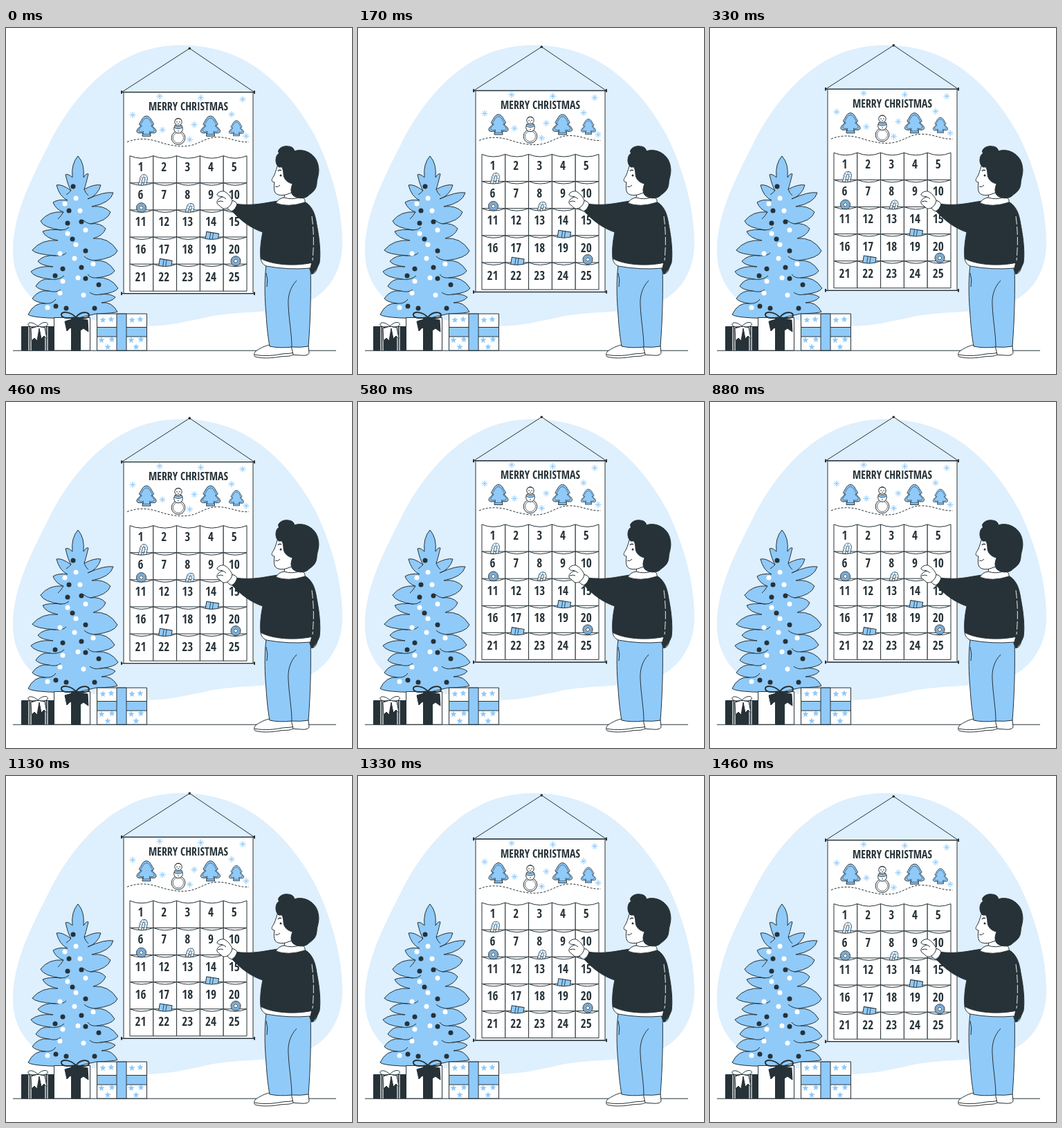
An HTML page with a canvas that plays this animation: 500 px wide and 500 px high, repeating every 1500 ms.

```html
<!DOCTYPE html>
<html lang="en">
<head>
<meta charset="utf-8">
<title>Advent calendar</title>
<style>
html, body { margin: 0; width: 100%; height: 100%; overflow: hidden; background: #fff; }
canvas { display: block; width: 500px; height: 500px; }
</style>
</head>
<body>
<canvas id="stage"></canvas>
<script>
const LOOP = 1500, STEPS = 36, LIFT = 10;
const BLUE = '#90caf9', PALE = '#deeffd', DARK = '#263238', WHITE = '#fff';
const FACE = '"Open Sans Condensed", "Roboto Condensed", "Open Sans", Roboto, sans-serif';

const canvas = document.getElementById('stage');
const ctx = canvas.getContext('2d');
const ratio = window.devicePixelRatio || 1;
canvas.width = canvas.height = 500 * ratio;

function shape(d, fill, stroke = DARK, width = 1) {
  const path = d instanceof Path2D ? d : new Path2D(d);
  if (fill) { ctx.fillStyle = fill; ctx.fill(path); }
  if (stroke) { ctx.strokeStyle = stroke; ctx.lineWidth = width; ctx.stroke(path); }
}

function disc(x, y, r, fill, stroke = null, width = 1) {
  const path = new Path2D();
  path.arc(x, y, r, 0, Math.PI * 2);
  shape(path, fill, stroke, width);
}

function box(x, y, w, h, fill, stroke = DARK) {
  const path = new Path2D();
  path.rect(x, y, w, h);
  shape(path, fill, stroke);
}

function at(x, y, draw, scale = 1, turn = 0) {
  ctx.save();
  ctx.translate(x, y);
  ctx.rotate(turn);
  ctx.scale(scale, scale);
  draw();
  ctx.restore();
}

function fontSize(sample, room, largest) {
  ctx.font = `100px ${FACE}`;
  return Math.min(largest, 100 * room / ctx.measureText(sample).width);
}

function label(text, x, y, size) {
  ctx.font = `${size}px ${FACE}`;
  ctx.textAlign = 'center';
  ctx.fillStyle = DARK;
  ctx.fillText(text, x, y + ctx.measureText('H').actualBoundingBoxAscent / 2);
}

function background() {
  shape('M10 322C10 268 38 216 60 172C88 114 128 67 175 43C216 22 266 20 311 33C370 50 416 100 446 155' +
    'C471 205 487 265 486 313C485 352 466 384 430 399C382 414 334 408 290 418C250 427 220 433 190 430' +
    'C150 428 122 420 92 416C45 408 10 374 10 322Z', PALE, null);
  shape('M10 466.2H477');
}

// Tree: each branch is a tip followed by the notch below it.
const rightBranches = [
  [119, 211, 113, 233], [137, 227, 118, 247], [155, 238, 124, 258], [151, 266, 122, 283],
  [144, 290, 126, 304], [161, 322, 128, 336], [157, 351, 131, 361], [162, 376, 136, 385],
  [158, 389, 138, 397], [161, 410, 130, 413]
];
const leftBranches = [
  [86, 212, 94, 235], [73, 227, 89, 249], [68, 252, 83, 266], [50, 279, 80, 292],
  [53, 294, 75, 307], [38, 321, 72, 329], [46, 337, 68, 345], [36, 352, 64, 363],
  [43, 373, 62, 380], [38, 391, 57, 398], [32, 414, 62, 419]
];

function branchSide(path, branches, side) {
  let x = 104 + side * 8, y = 216;
  path.moveTo(104, 185);
  path.quadraticCurveTo(104 + side * 10, 196, x, y);
  for (const [tx, ty, nx, ny] of branches) {
    path.quadraticCurveTo(x + (tx - x) * 0.65, Math.min(y, ty) - 2, tx, ty);
    path.quadraticCurveTo(tx - side * 4, ty + (ny - ty) * 0.75, nx, ny);
    x = nx; y = ny;
  }
  path.lineTo(100, 420);
}

function pine() {
  const path = new Path2D();
  branchSide(path, rightBranches, 1);
  branchSide(path, leftBranches, -1);
  shape(path, BLUE);
  shape('M94 235Q90 239 87 241M113 233Q115 239 119 242M83 266Q79 273 75 276M122 283Q116 282 112 278' +
    'M80 292Q87 292 91 288M72 329Q82 330 87 325M128 336Q118 335 113 330M64 363Q76 365 84 358' +
    'M131 361Q123 362 118 356M62 380Q72 383 79 378M136 385Q127 387 121 382M57 398Q67 399 72 392', null);
  const dark = [[97, 229], [91, 264], [89, 282], [109, 280], [96, 305], [115, 322], [82, 348],
    [71, 358], [109, 346], [115, 362], [134, 371], [72, 402], [87, 405], [128, 405]];
  const light = [[101, 246], [107, 264], [85, 254], [115, 292], [89, 297], [101, 313], [78, 326],
    [99, 333], [126, 341], [82, 366], [104, 361], [78, 383], [60, 404], [112, 386]];
  for (const [x, y] of dark) disc(x, y, 3.5, DARK);
  for (const [x, y] of light) disc(x, y, 3.5, WHITE);
}

function star(x, y, r) {
  const path = new Path2D();
  for (let i = 0; i < 10; i++) {
    const a = i * Math.PI / 5 - Math.PI / 2, q = i % 2 ? r * 0.45 : r;
    path.lineTo(x + q * Math.cos(a), y + q * Math.sin(a));
  }
  shape(path, BLUE, null);
}

function presents() {
  box(131.5, 413, 72, 53, WHITE);
  for (const [x, y] of [[140, 422], [152, 421], [182, 422], [194, 421], [138, 451], [153, 450],
    [147, 461], [181, 451], [195, 450], [188, 461]]) star(x, y, 4.8);
  box(131.5, 432.5, 72, 13.5, BLUE);
  box(160, 413, 14, 53, BLUE);

  box(69.5, 418.5, 52, 47.5, WHITE);
  box(94.5, 418.5, 13, 47.5, DARK);
  shape('M101 419L85 424L88 438L93 433L98 436L103 420L106 438L112 434L119 439L118 422Z', DARK);
  shape('M101 418C92 409 79 409 80 415C82 421 93 419 101 418C109 408 121 410 120 416C119 420 109 420 101 418Z', null, DARK, 2);

  box(22.5, 431.5, 47, 34.5, DARK);
  shape('M33 432V466M36 432V466M57 432V466M60 432V466', null, WHITE, 1.2);
  shape('M46 431L36 434L37 452L41 448L45 452L48 434L51 449L55 445L59 449L56 433Z', WHITE);
  shape('M46 431C39 424 31 425 32 429C34 433 41 432 46 431C53 423 62 425 60 429C58 433 51 432 46 431Z', WHITE);
}

const cookie = new Path2D('M0-15C5-15 7-9 9-6C11-4 11-2 8-1C11 2 14 4 14 7C14 10 9 10 5.5 9L6 14H-6L-5.5 9' +
  'C-9 10-14 10-14 7C-14 4-11 2-8-1C-11-2-11-4-9-6C-7-9-5-15 0-15Z');

function cookieTree() {
  shape(cookie, BLUE);
  at(0, 0, () => shape(cookie, null, DARK, 0.8), 0.8);
}

function snowflake(x, y) {
  const path = new Path2D();
  for (let i = 0; i < 4; i++) {
    const a = i * Math.PI / 4, c = 4.6 * Math.cos(a), s = 4.6 * Math.sin(a);
    path.moveTo(x - c, y - s);
    path.lineTo(x + c, y + s);
  }
  shape(path, null, BLUE, 1);
}

function snowman() {
  disc(249, 159, 9.8, WHITE, DARK);
  disc(249, 159, 7.6, WHITE, DARK, 0.7);
  disc(249, 146, 6.3, WHITE, DARK);
  disc(249, 136, 5.2, WHITE, DARK);
  shape('M244 141Q249 145 254 141L255 144Q249 148 243 144Z', BLUE, DARK, 0.8);
  shape('M244.5 133Q249 129 253.5 133', null);
  for (const [x, y] of [[247, 136], [251, 136], [249, 138.5], [249, 149]]) disc(x, y, 0.8, DARK);
}

function cane() {
  const hook = 'M-4 9L-2.5-2C-1.5-7.5 5-6.5 4.3-1L3.3 9';
  shape(hook, null, DARK, 4.6);
  shape(hook, null, WHITE, 3);
  ctx.setLineDash([1.8, 2]);
  shape(hook, null, BLUE, 3);
  ctx.setLineDash([]);
}

function donut() {
  disc(0, 0, 7, BLUE, DARK);
  disc(0, 0, 5, null, DARK, 0.5);
  disc(0, 0, 2.6, WHITE, DARK, 0.9);
}

function parcel() {
  box(-9, -4.5, 18, 11, BLUE);
  shape('M-3-4.5V6.5M1-4.5V6.5', null, DARK, 0.8);
}

const treats = {
  1: [cane, 198, 219.5, 0.1], 6: [donut, 195.5, 260, 0], 8: [cane, 265.5, 261, 0.15],
  14: [parcel, 298, 300.5, 0.16], 17: [parcel, 230.5, 339.5, 0.16], 20: [donut, 332, 337, 0]
};

function pockets() {
  const size = fontSize('22', 16, 20.5), cell = 33.8, left = 179;
  for (let row = 0; row < 5; row++) {
    const top = 185 + row * 39.1;
    for (let col = 0; col < 5; col++) {
      const x = left + col * cell;
      shape(`M${x} ${top}Q${x + cell / 2} ${top + 7} ${x + cell} ${top}V${top + 39.1}H${x}Z`, WHITE);
    }
    for (let col = 0; col < 5; col++) {
      const day = row * 5 + col + 1;
      label(day, left + (col + 0.46) * cell, 200.8 + row * 39.7, size);
      if (treats[day]) {
        const [draw, x, y, turn] = treats[day];
        at(x, y, draw, 1, turn);
      }
    }
  }
}

function calendar() {
  shape('M168 92.5L265.3 29.8L358 92.5', null);
  disc(265.3, 29.8, 1.8, DARK);
  box(170, 93, 187, 291, WHITE);
  for (const y of [93, 384]) {
    shape(`M166 ${y}H360`, null, DARK, 1.3);
    for (const x of [167, 359]) shape(`M${x - 1} ${y}H${x + 1}`, null, DARK, 4.4);
  }
  for (const [x, y] of [[222, 99], [281.5, 101], [342, 103.3], [183, 126], [326, 125],
    [272, 140], [226, 147.5], [265.5, 161.5], [347, 156.5]]) snowflake(x, y);
  label('MERRY CHRISTMAS', 263.5, 113.5, fontSize('MERRY CHRISTMAS', 115, 21));
  ctx.setLineDash([3, 2]);
  shape('M175 165C190 159 204 160 218 164C236 170 252 173 267 170C283 166 290 158 306 158C324 158 334 166 351 165', null);
  ctx.setLineDash([]);
  at(203, 142.5, cookieTree);
  at(295.5, 142.5, cookieTree);
  at(333, 145.5, cookieTree, 0.76);
  snowman();
  pockets();
}

function person() {
  // shoes and trousers
  shape('M411 459H437L438 470Q436 474 426 473L412 472Z', WHITE);
  shape('M381 458C374 459 367 463 361 467C358 470 358 473 360 475C370 478 385 477 396 475C404 474 411 475 415 472L412 459Z', WHITE);
  shape('M359 472C374 475 389 473 399 471C406 470 411 471 415 469', null);
  shape('M376 342C373 369 374 391 376 415C377 433 379 449 381 460Q395 463 413 461Q426 462 437 460' +
    'C440 421 441 381 440 343Z', BLUE);
  shape('M420 365C411 374 407 387 408 401C409 423 413 443 413 461M376 354Q379 364 377 374', null);

  // far hand and arm
  shape('M441 346L443 355Q448 355 450 345Z', WHITE);
  shape('M432 252C443 257 447 270 449 284C453 304 455 325 453 339Q449 350 442 356L438 346Z', DARK);

  // hem, sweater and pointing arm
  shape('M368 333Q369 341 376 344Q408 350 440 347L442 338Z', WHITE);
  shape('M393 250C376 252 358 258 330 254L325 263C339 278 353 289 371 295C368 309 367 322 368 333' +
    'C384 342 416 345 443 339C446 319 446 294 445 276C443 264 440 255 431 251Z', DARK);
  ctx.setLineDash([12, 3]);
  shape('M442 272C445 293 445 314 443 336', null, WHITE, 0.9);
  ctx.setLineDash([]);
  shape('M326 249Q332 250 334 254Q332 262 326 265Q321 263 319 259Z', WHITE);
  shape('M327 249C324 243 320 238 315 236C311 235 305 238 305 241C306 244 311 243 313 244' +
    'C307 246 304 250 305 253C306 256 309 256 311 259C314 262 317 261 320 260Q326 256 327 249Z', WHITE);
  shape('M313 244Q316 245 318 247M306 251Q311 249 314 251', null);

  // neck, collar, face
  shape('M403 234L402 248Q415 253 429 247L426 233Z', WHITE);
  shape('M402 245Q394 246 390 253Q407 260 432 252Q433 247 427 244Q413 249 402 245Z', WHITE);
  shape('M394 194C391 202 390 208 387 214C385 217 383 220 385 222Q387 223 388 223' +
    'C387 229 387 234 389 238C393 243 402 242 407 240L421 235L418 198Z', WHITE);
  disc(397, 213, 1.5, DARK);
  shape('M393 207Q395 204 398 206', null, DARK, 1.3);
  shape('M389 229Q393 231 396 227', null);

  // hair
  shape('M394 201C388 196 389 183 395 181C390 177 399 169 408 171C413 171 416 174 417 178' +
    'C430 173 448 182 451 198C454 210 449 217 449 225C448 236 440 239 436 243' +
    'C430 248 418 246 414 241C410 235 413 229 414 225C408 224 401 219 401 211C401 207 400 204 399 201Z', DARK);
  shape('M410 222Q404 217 406 212Q411 210 414 217', DARK);
}

function render(now) {
  const step = Math.floor((now % LOOP + 4) * STEPS / LOOP) % STEPS;
  const phase = (step + 0.5) / STEPS;
  const rise = LIFT * (1 - Math.abs(2 * phase - 1));
  ctx.setTransform(ratio, 0, 0, ratio, 0, 0);
  ctx.lineJoin = 'round';
  if ('fontStretch' in ctx) ctx.fontStretch = 'extra-condensed';
  ctx.fillStyle = WHITE;
  ctx.fillRect(0, 0, 500, 500);
  background();
  pine();
  presents();
  at(0, -rise, calendar);
  person();
}

const start = performance.now();
function tick() {
  render(performance.now() - start);
  requestAnimationFrame(tick);
}
tick();
</script>
</body>
</html>
```
